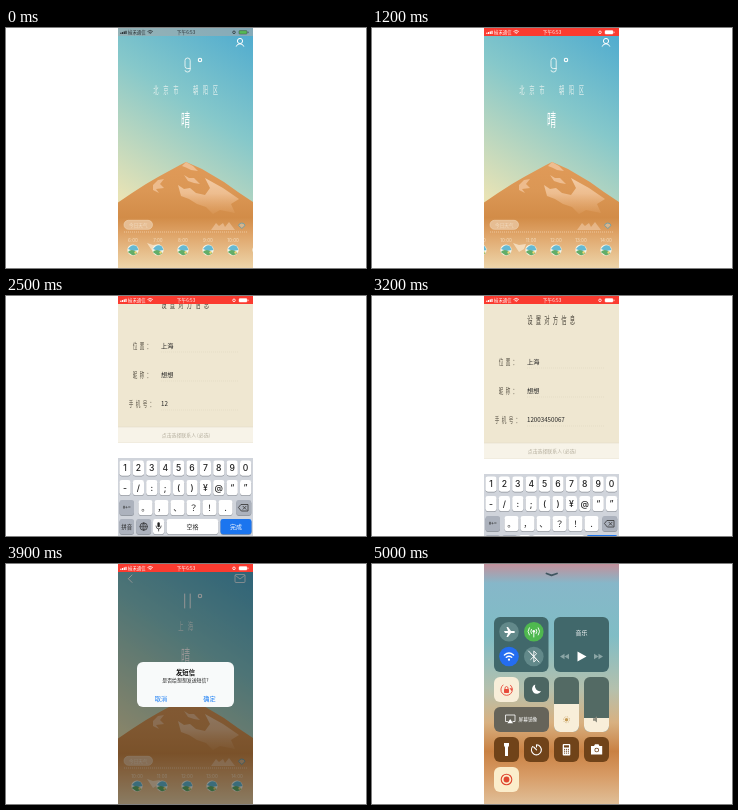
An HTML page that plays this animation: 360 by 240 pixels, repeating every 5100 ms.

```html
<!DOCTYPE html>
<html lang="en">
<head>
<meta charset="utf-8">
<title>Weather greeting</title>
<style>
html, body { margin: 0; width: 100%; height: 100%; overflow: hidden; background: #fff; }
svg { display: block; width: 100vw; height: 100vh; font-family: "Noto Sans CJK SC", "Noto Sans CJK", "Noto Sans", sans-serif; }
.latin { font-family: Inter, Roboto, sans-serif; }
</style>
</head>
<body>
<svg id="stage" viewBox="0 0 360 240"></svg>
<script>
const LOOP = 5100, STEP = 100;
const PHONE = '12003450067';
const BLUE = '#187cf4', INK = '#222';

// Markup helpers
const rect = (x, y, w, h, fill, r = 0, extra = '') =>
  `<rect x="${x}" y="${y}" width="${w}" height="${h}" rx="${r}" fill="${fill}" ${extra}/>`;
const circle = (x, y, r, fill, extra = '') => `<circle cx="${x}" cy="${y}" r="${r}" fill="${fill}" ${extra}/>`;
const shape = (d, fill, extra = '') => `<path d="${d}" fill="${fill}" ${extra}/>`;
const line = (d, stroke, w = 1, extra = 'stroke-linecap="round"') =>
  `<path d="${d}" fill="none" stroke="${stroke}" stroke-width="${w}" stroke-linejoin="round" ${extra}/>`;
const text = (s, x, y, size, fill, anchor = 'start', extra = '') =>
  `<text x="${x}" y="${y}" font-size="${size}" fill="${fill}" text-anchor="${anchor}" ${extra}>${s}</text>`;
const group = (id, body, extra = '') => `<g id="${id}" ${extra}>${body}</g>`;

// Tall, narrow display lettering
const slim = (s, x, y, size, pitch, fill) => [...s].map((c, i) =>
  `<text transform="translate(${x + i * pitch} ${y}) scale(.54 1)" font-size="${size}" text-anchor="middle" fill="${fill}">${c}</text>`).join('');

function statusBar(color, battery) {
  const bars = [0, 1, 2, 3].map(i => rect(114.3 + i * 1.7, 4.6 - i * .6, 1.2, 1.4 + i * .6, color)).join('');
  return bars + text('榆禾通信', 122, 5.8, 4.4, color)
    + line('M141.8 3.3Q144.2 1.2 146.6 3.3M142.9 4.5Q144.2 3.4 145.5 4.5', color, .8) + circle(144.2, 5.6, .5, color)
    + text('下午6:53', 180, 5.9, 4.7, color, 'middle', 'font-weight="500"')
    + circle(228, 4.3, 1.3, 'none', `stroke="${color}" stroke-width=".8"`)
    + rect(233, 2.6, 8, 3.5, battery, .8, `stroke="${color}" stroke-width=".4"`) + rect(241.7, 3.6, .7, 1.5, color);
}

const mountain =
  shape('M112 174.5L126 165 140 156 152 149 163 143 174 137 180 134 187 137 196 141 207 147.5 218 154 232 164 247 174V240H112Z', 'url(#rock)')
  + shape('M180 134L176 138 180 139.5 185 142 192 143 187 138Z', '#eebd90')
  + shape('M178 147L183 150 188 150 194 156 188 155 182 153Z', '#eebd90')
  + shape('M147 157L152 152 158 151 154 156 158 160 150 161 153 165 147 162Z', '#edbb8d')
  + shape('M172 157L178 161 184 160 190 165 199 167 204 160 199 150 208 155 217 160 233 171 225 176 229 185 214 182 207 186 200 179 191 176 183 171 175 168Z', 'url(#snow)')
  + shape('M205 202L210 195 213 198 217 195 219 199 223 194 229 202Z', '#f2d0ae', 'opacity=".55"')
  + shape('M141 215L147 217 154 216 152 221 147 224Z', '#f8e3c8', 'opacity=".8"');

const hours = Array.from({ length: 13 }, (_, i) => {
  const x = 127 + i * 25;
  return text(`${(i + 6) % 24}:00`, x, 214, 4.5, '#fff3df', 'middle', 'class="latin" opacity=".7"')
    + circle(x, 222, 5.6, '#f4f5ea')
    + shape(`M${x - 5} 221Q${x - 1} 215 ${x + 4} 218.5L${x + 5.4} 222 ${x} 223Z`, '#65b9d2')
    + shape(`M${x - 5.2} 224Q${x - 1} 219.5 ${x + 4.6} 225A5.6 5.6 0 0 1 ${x - 1} 227Z`, '#62ad68')
    + circle(x + 2.6, 224.5, 1.2, '#f3d577');
}).join('');

const backArrow = color => line('M126 11L122.3 14.7 126 18.4', color, 1);

const weather = rect(112, 0, 135, 240, 'url(#sky)') + mountain
  + circle(194, 32, 1.7, 'none', 'stroke="#fff" stroke-width="1.1"')
  + slim('晴', 179.5, 98, 17, 0, '#fff')
  + group('home',
    line('M184.2 40.5H181.3Q179 40.5 179 38.2V32.5Q179 30 181.6 30T184.2 32.5V41.5Q184.2 44 181.6 44T179 42.5', '#eef6f4', .9)
    + slim('北京市 朝阳区', 150, 65.5, 9.8, 9.9, '#e3f0ee')
    + circle(234, 13, 2.6, 'none', 'stroke="#fff" stroke-width="1"') + line('M230.3 18.2Q231 15.8 234 15.8T237.7 18.2', '#fff'))
  + group('away',
    line('M178.7 30V44M184.2 30V44', '#fff', 1) + slim('上海', 175, 65.5, 9.8, 9.5, '#e3f0ee')
    + backArrow('#fff') + rect(229, 10.5, 10, 8, 'none', 1, 'stroke="#fff" stroke-width=".8"') + line('M229.5 11.5L234 15 238.5 11.5', '#fff', .8))
  + rect(118, 192.3, 28.5, 9, '#e6bd93', 4.5, 'stroke="#f0d5b5" stroke-width=".6"')
  + text('今日天气', 132.3, 198.6, 4.6, '#f6e3cb', 'middle', 'opacity=".8"')
  + line('M118 204H241', '#f8e0c4', .6, 'stroke-dasharray="1 1"')
  + shape('M232.6 197.5A3.3 3.3 0 0 1 239 197.5L235.8 200.5Z', '#d9b58c', 'stroke="#6a9da8" stroke-width=".9"')
  + group('hours', hours);

const field = (label, x, y, pitch, id) => slim(label, x, y + 3.2, 8.5, pitch, '#5d574a')
  + line(`M155 ${y + 6}H232`, '#cfc7b0', .4, 'stroke-dasharray=".8 1.2"')
  + group(id, '');

const form = rect(112, 0, 135, 240, '#efe7d1')
  + group('fields', backArrow('#333')
    + slim('设置对方信息', 158, 38.5, 10, 8.5, '#4d483d')
    + field('位置：', 129, 77, 7, 'place') + field('昵称：', 129, 106, 7, 'nick') + field('手机号：', 125, 135, 7, 'phone'));

// Keyboard
const keyCap = (x, y, w, fill = '#fff') => rect(x, y + .8, w, 15.2, '#8d929a', 2.4) + rect(x, y, w, 15.2, fill, 2.4);
const keyRow = (chars, cx, y, pitch = 13.4, w = 11.2) => [...chars].map((c, i) => {
  const x = cx + i * pitch;
  return keyCap(x - w / 2, y, w) + text(c, x, y + 10.6, 8.6, INK, 'middle', 'class="latin" font-weight="500"');
}).join('');
const GREY = '#acb2bd';
const eraser = keyCap(230.3, 204, 15, GREY)
  + line('M235.3 208.5H242V215H235.3L232.7 211.8ZM237 210.3L240 213.3M240 210.3L237 213.3', '#333', .8);
const bottomRow = (left, action) => keyCap(113.5, 223, 14.5, GREY) + text(left, 120.7, 233, 5.4, INK, 'middle')
  + keyCap(130.3, 223, 14.8, GREY) + circle(137.7, 230.6, 3.7, 'none', `stroke="${INK}" stroke-width=".7"`)
  + line('M134 230.6H141.4M137.7 227V234.2M137.7 227Q134 230.6 137.7 234.2Q141.4 230.6 137.7 227', INK, .5)
  + keyCap(147, 223, 11.2) + rect(151.4, 226.3, 2.4, 5, INK, 1.2) + line('M150 230Q150.3 233 152.6 233T155.2 230M152.6 233V235', INK, .7)
  + keyCap(160.7, 223, 51.5) + text('空格', 186.4, 233, 6, INK, 'middle')
  + keyCap(214.5, 223, 31, action === '完成' ? '#1b75ef' : GREY)
  + text(action, 230, 233, 6, action === '完成' ? '#fff' : INK, 'middle');
const candidates = words => rect(112, 147, 135, 16, '#fafafa') + line('M112 147H247', '#ddd', .5)
  + [...words].map((w, i) => text(w, 120 + i * 15.6, 157.6, 7, INK, 'middle')).join('')
  + rect(230.5, 148, 16.5, 14, '#fafafa') + line('M236.3 156.5L239 153.8 241.7 156.5', INK, .8);
const letters = action => rect(112, 163, 135, 77, '#d0d4db')
  + keyRow('qwertyuiop', 119, 164.5) + keyRow('asdfghjkl', 126, 184) + keyRow('zxcvbnm', 139.5, 204)
  + keyCap(113.5, 204, 14.5, GREY) + line('M117 212L120.8 208 124.6 212H122.7V215H118.9V212Z', INK, .8)
  + eraser + bottomRow('123', action);
const numbers = rect(112, 147, 135, 16, '#fff') + rect(112, 162, 135, 90, '#d0d4db')
  + keyRow('1234567890', 119, 164.5) + keyRow('-/:;()¥@“”', 119, 184)
  + keyCap(113.5, 204, 14.5, GREY) + text('#+=', 120.7, 213.2, 4.8, INK, 'middle')
  + keyRow('。，、？！.', 139.5, 204, 16, 14) + eraser + bottomRow('拼音', '完成');
const popup = shape('M145.5 181H160Q162.5 181 162.5 184V198Q162.5 202 158.5 205V217Q158.5 219 156.5 219H149.5Q147.5 219 147.5 217V205Q143 202 143 198V184Q143 181 145.5 181Z', '#fff', 'stroke="#c4c8ce" stroke-width=".5"')
  + text('X', 152.8, 195.5, 11, INK, 'middle', 'class="latin"');
const entry = group('entry',
  rect(112, 131, 135, 130, '#fff') + rect(112, 131, 135, 16, '#f7f3e8') + line('M112 131H247M112 147H247', '#dcd5c0', .5)
  + group('hint', '') + group('pinyin', candidates('我你嗯在不这一好') + letters('完成'))
  + group('digits', numbers) + group('popup', popup));

const alertBox = rect(131, 98, 97, 45, '#f8fafa', 6)
  + text('发短信', 179.5, 110.8, 6.3, '#111', 'middle', 'font-weight="700"')
  + text('是否给想想发送短信?', 179.5, 118.3, 4.9, '#222', 'middle')
  + text('取消', 155, 136.7, 6.2, BLUE, 'middle', 'font-weight="500"') + text('确定', 203.5, 136.7, 6.2, BLUE, 'middle');

const message = rect(112, 0, 135, 240, '#fff') + rect(112, 0, 135, 22.5, '#f8f8f8') + line('M112 22.5H247', '#d5d5d5', .5)
  + text('新信息', 179.5, 18.2, 6.4, '#111', 'middle', 'font-weight="700"') + text('取消', 228.5, 18, 6.2, BLUE)
  + text('收件人：', 115, 33.6, 5.4, '#999') + text(PHONE + ',', 139.5, 33.6, 5.4, '#48b83e', 'start', 'class="latin"')
  + circle(239.6, 31.7, 3.8, 'none', `stroke="${BLUE}" stroke-width=".7"`) + line('M237.5 31.7H241.7M239.6 29.6V33.8', BLUE, .7)
  + line('M112 40.5H247', '#ddd', .5)
  + rect(118, 134.8, 12.2, 8.6, '#7f8791', 2) + line('M123.2 137L125.3 139.1 123.2 141.2', '#fff', .9)
  + rect(136, 125.5, 105, 20.8, '#fff', 7, 'stroke="#ccc" stroke-width=".6"')
  + text('亲爱的想想你那里今天的温度', 141, 134, 6.2, INK) + text('是:11° 你那里今天天气是:晴', 141, 142.3, 6.2, INK)
  + group('caret', line('M216.5 136V143', BLUE, .7))
  + circle(234.6, 139.2, 4.7, '#3fc34b') + line('M234.6 141.8V136.8M232.6 138.7L234.6 136.7 236.6 138.7', '#fff', .9)
  + candidates('天朗空雨水了的好') + letters('换行');

// Control centre
const TEAL = '#41686b', BROWN = '#704319', CREAM = '#f8eed9';
const tile = (x, y, fill, w = 25, h = 25) => rect(x, y, w, h, fill, 6);
const control = rect(112, 0, 135, 240, 'url(#blur)') + line('M174.5 9.5L179.5 11.3 185 9.5', '#3f5660', 1.8)
  + tile(122, 53, TEAL, 54.5, 55) + tile(182, 53, TEAL, 55, 55)
  + circle(137, 67.8, 9.8, '#62898a') + shape('M132 67H136L134.5 63H136L139 67H142Q144 68 142 69H139L136 73H134.5L136 69H133Z', '#fff')
  + circle(161.8, 67.8, 9.8, '#4fb84f') + line('M161.8 68V73M159.4 65.3Q158 67.4 159.4 69.5M164.2 65.3Q165.6 67.4 164.2 69.5M157.3 63.8Q154.6 67.4 157.3 71M166.3 63.8Q169 67.4 166.3 71', '#fff', .9) + circle(161.8, 67.3, 1.3, '#fff')
  + circle(137, 92.5, 9.8, '#246df0') + line('M132.4 91Q137 86.9 141.6 91M134.3 93.3Q137 91 139.7 93.3', '#fff', 1.4) + circle(137, 95.7, 1.1, '#fff')
  + circle(161.8, 92.5, 9.8, '#62898a') + line('M158.7 89.5L164.6 95.3 161.8 98V87L164.6 89.7 158.7 95.5M156.5 87L167 98', '#fff', .9)
  + text('音乐', 209.5, 70.7, 6, '#fff', 'middle', 'font-weight="500"')
  + shape('M205.5 87.5L214.5 92.5 205.5 97.5Z', '#fff')
  + shape('M192.5 89.8V95.2L188 92.5ZM197 89.8V95.2L192.5 92.5ZM222 89.8L226.5 92.5 222 95.2ZM226.5 89.8L231 92.5 226.5 95.2Z', '#8aa5a5')
  + tile(122, 113, CREAM) + rect(132, 125, 5, 4, '#e84b3c', .7) + line('M133 125V123.5Q134.5 121.5 136 123.5V125M131 121A5.8 5.8 0 1 0 138.5 121.2', '#e84b3c', .9) + shape('M137.5 124L141 124.7 139.5 127Z', '#e84b3c')
  + tile(152, 113, '#4c6662') + shape('M163.2 120.5A4.8 4.8 0 1 0 169.2 127A5 5 0 0 1 163.2 120.5Z', '#fff')
  + tile(122, 143, '#66645a', 55) + line('M135.5 157.5H133.5V151H143V157.5H141', '#fff', .8) + shape('M138.2 155L141 159.3H135.4Z', '#fff')
  + text('屏幕镜像', 146.5, 157.2, 4.7, '#fff')
  + tile(182, 113, '#536a64', 25, 55) + rect(182, 140, 25, 28, CREAM, 0, 'clip-path="url(#sliders)"')
  + tile(212, 113, '#536a64', 25, 55) + rect(212, 154, 25, 14, CREAM, 0, 'clip-path="url(#sliders)"')
  + circle(194.5, 155.7, 1.7, '#c49a55') + circle(194.5, 155.7, 3, 'none', 'stroke="#c49a55" stroke-width=".9" stroke-dasharray=".8 1.556"')
  + shape('M221 154.3H222.8L225 152.3V158.5L222.8 156.7H221Z', '#8f8d7f')
  + [122, 152, 182, 212].map(x => tile(x, 173, BROWN)).join('')
  + shape('M132 179H137V181.5L136 183.5V192H133V183.5L132 181.5Z', '#fff')
  + line('M164.5 180.8A5 5 0 1 1 160.6 182.5M164.5 180.8V183M164.6 185.8L161.7 183', '#fff', 1.1)
  + rect(190.7, 180, 7.6, 11.5, '#fff', 1) + rect(192, 181.3, 5, 2.2, BROWN)
  + [0, 1, 2, 3, 4, 5, 6, 7, 8].map(i => circle(192.6 + i % 3 * 1.9, 185.3 + Math.floor(i / 3) * 1.9, .6, BROWN)).join('')
  + shape('M219 182H222L223 180.3H226.5L227.5 182H230.2V190.5H219Z', '#fff') + circle(224.7, 186, 2.3, BROWN) + circle(224.7, 186, 1.5, '#fff')
  + tile(122, 203, '#fbedcb') + circle(134.5, 215.5, 5.3, 'none', 'stroke="#df4630" stroke-width="1.1"') + circle(134.5, 215.5, 2.9, '#df4630');

const gradient = (id, axis, stops) => `<linearGradient id="${id}" gradientUnits="userSpaceOnUse" ${axis}>`
  + stops.map(([o, c, a = 1]) => `<stop offset="${o}" stop-color="${c}" stop-opacity="${a}"/>`).join('') + '</linearGradient>';
const vertical = 'x1="0" y1="0" x2="0" y2="240"';

document.getElementById('stage').innerHTML = '<defs>'
  + gradient('sky', 'x1="240" y1="0" x2="125" y2="175"', [[0, '#4fabcf'], [.45, '#86c8ca'], [1, '#e8e3b5']])
  + gradient('rock', vertical, [[.56, '#e09a58'], [.68, '#db9755'], [.79, '#d28c48'], [.86, '#dfa468'], [1, '#edd5aa']])
  + gradient('snow', vertical, [[.62, '#f3cda8'], [.69, '#efc195', .9], [.78, '#e6ac74', .15]])
  + gradient('blur', vertical, [[0, '#c3909b'], [.08, '#86b7c9'], [.3, '#80bdc5'], [.52, '#b4c0ad'], [.66, '#d8b181'], [.78, '#c98143'], [.88, '#d79b65'], [1, '#e0bf98']])
  + `<clipPath id="screen">${rect(112, 0, 135, 240, '#000')}</clipPath>`
  + `<clipPath id="sliders">${tile(182, 113, '#000', 25, 55)}${tile(212, 113, '#000', 25, 55)}</clipPath></defs>`
  + '<g clip-path="url(#screen)">' + group('weather', weather) + group('form', form + entry)
  + group('dim', rect(112, 8, 135, 232, '#000')) + group('alert', alertBox) + group('message', message)
  + group('plainBar', rect(112, 0, 135, 8, '#a3abad', 0, 'opacity=".65"') + statusBar('#2c3438', '#56b954'))
  + group('redBar', rect(112, 0, 135, 8, '#fb3b30') + statusBar('#fff', '#fff'))
  + group('control', control) + '</g>';

const ui = {};
document.querySelectorAll('g[id]').forEach(g => ui[g.id] = g);
const show = (id, on) => ui[id].setAttribute('display', on ? 'inline' : 'none');
const move = (id, x, y) => ui[id].setAttribute('transform', `translate(${x} ${y})`);
const fill = (id, body) => { ui[id].innerHTML = body; };
const ramp = (t, a, b) => Math.max(0, Math.min(1, (t - a) / (b - a)));
const ease = (t, a, b) => 1 - (1 - ramp(t, a, b)) ** 2;

function input(id, y, value, placeholder, focused) {
  const body = value ? text(value, 155, y + 2.3, 6.2, INK, 'start', 'font-weight="500"') : slim(placeholder, 160, y + 3, 8, 7, '#c9c2ad');
  fill(id, body + (focused && !value ? line(`M155.4 ${y - 3.5}V${y + 3.5}`, INK, .8) : ''));
}

function drawForm(t) {
  const place = ['', 's', 'shang hai', '上海'][Math.round(ramp(t, 1600, 1900) * 3)];
  const nick = ['', 'x', 'xiang', '想想'][Math.round(ramp(t, 2000, 2300) * 3)];
  const numeric = t >= 2400;
  const focus = numeric ? 2 : t >= 2000 ? 1 : 0;
  const lift = 109 * (1 - ease(t, 1500, 1700)) + 16 * ramp(t, 3100, 3200) + 60 * ramp(t, 3200, 3300);
  input('place', 77, place, '对方的位置（必填）', focus === 0);
  input('nick', 106, nick, '对方的昵称（必填）', focus === 1);
  input('phone', 135, PHONE.slice(0, Math.round(ramp(t, 2400, 3100) * 11)), '对方手机（必填）', focus === 2);
  fill('hint', text(['请填写位置（必填）', '请填爱的昵称（必填）', '点击选择联系人 (必选)'][focus], 180, 141, 4.9, '#b3ad9c', 'middle'));
  show('pinyin', !numeric);
  show('digits', numeric);
  show('popup', t === 2000);
  move('entry', 0, lift);
  move('fields', 0, numeric ? Math.min(0, lift - 27) : 0);
  move('form', 135 * (1 - ease(t, 1200, 1500)), 0);
}

function draw(ms) {
  const t = Math.floor(ms % LOOP / STEP) * STEP;
  const away = t >= 3400;
  const formOpen = t >= 1300 && !away;
  const pop = ramp(t, 3700, 3900);
  const alertOpen = t > 3700 && t < 4100;
  const sheet = t < 4500 ? ease(t, 4100, 4300) : 1 - ramp(t, 4500, 4700);
  show('home', !away);
  show('away', away);
  move('hours', away ? -96 * ease(t, 3500, 3700) : -75 * ease(t, 0, 600) - 10 * ramp(t, 600, 800) - 8 * ramp(t, 1000, 1200), 0);
  show('form', formOpen);
  if (formOpen) drawForm(t);
  show('dim', alertOpen);
  ui.dim.setAttribute('opacity', .42 * pop);
  show('alert', alertOpen);
  ui.alert.setAttribute('opacity', pop);
  const zoom = 1.15 - .15 * pop;
  ui.alert.setAttribute('transform', `translate(${179.5 * (1 - zoom)} ${120.5 * (1 - zoom)}) scale(${zoom})`);
  show('message', sheet > 0);
  move('message', 0, 232 * (1 - sheet));
  show('caret', t >= 4500);
  show('plainBar', t === 0);
  show('redBar', t > 0);
  show('control', t >= 5000);
}

const start = performance.now();
function tick() {
  draw(performance.now() - start);
  requestAnimationFrame(tick);
}
tick();
</script>
</body>
</html>
```
